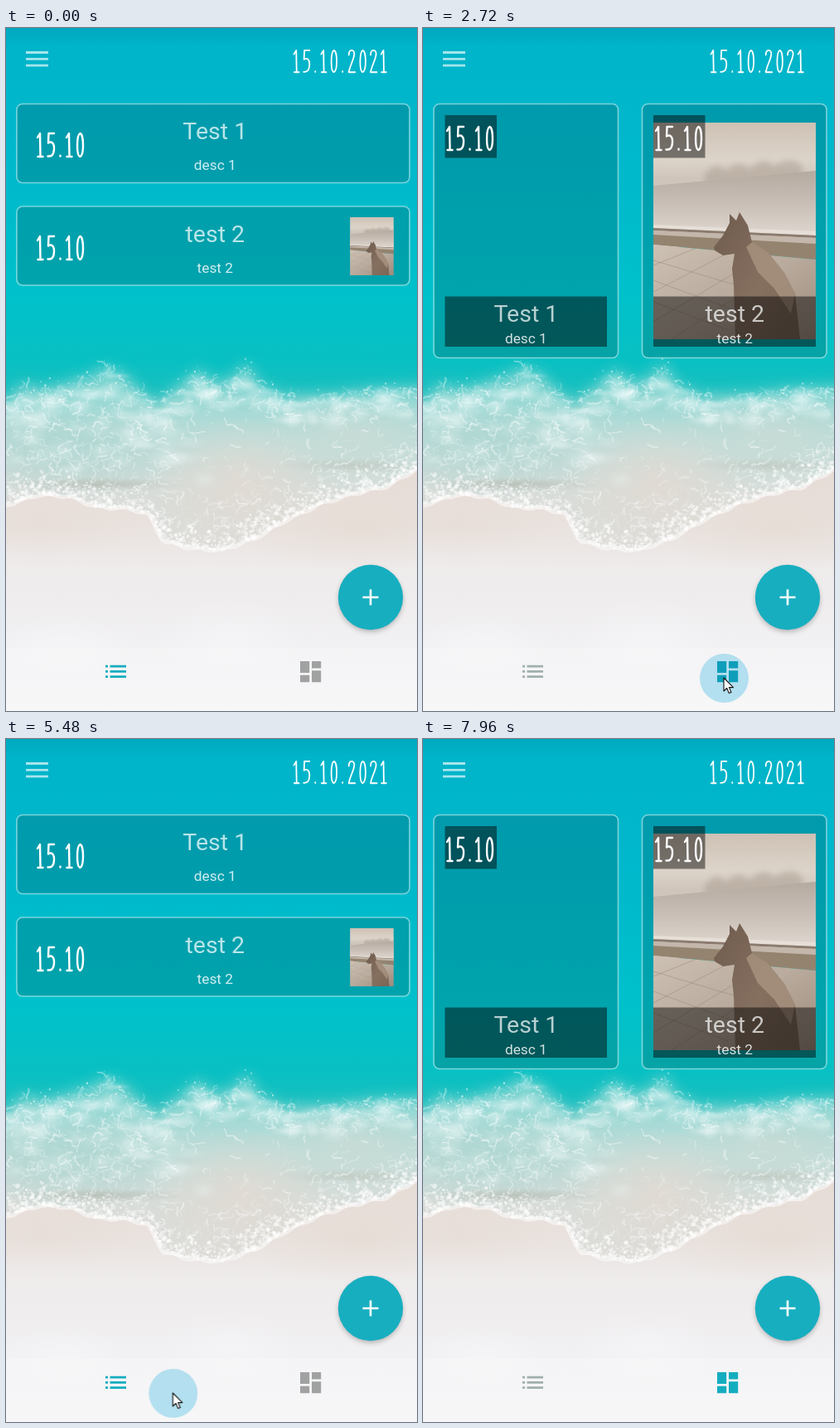
These frames come from a looping animation (496x823 px, 8 s). An HTML page with a canvas:

```html
<!DOCTYPE html>
<html lang="en">
<head>
<meta charset="utf-8">
<title>Day notes</title>
<style>
  html, body { margin: 0; width: 100%; height: 100%; overflow: hidden; }
  #stage { position: absolute; inset: 0; overflow: hidden; background: #f3f3f5; }
  #stage > * { position: absolute; left: 0; top: 0; display: block; }

  text { font-family: Roboto, sans-serif; text-anchor: middle; fill: #fff; }
  .title { font-size: 28.5px; fill-opacity: .72; }
  .desc { font-size: 17.3px; fill-opacity: .82; }
  .card { fill: rgba(0,0,0,.15); stroke: rgba(255,255,255,.48); stroke-width: 1.6; }
  .shade { fill: rgba(0,0,0,.47); }
  .date { fill: none; stroke: #fff; stroke-width: 2.4; stroke-linecap: round; stroke-linejoin: round; }
  .date.thin { stroke-width: 1.9; }
  .on { fill: #14adbf; }
  .off { fill: #a0a2a1; }
  .off.soft { fill: #a0b0ac; }

  .list, .grid, .glow, .move, .ring { animation: 8s infinite; }
  .list { animation-name: list; animation-timing-function: step-end; }
  .grid { animation-name: grid; animation-timing-function: step-end; }
  .glow { animation-name: glow; fill: #fff; opacity: 0; }
  .move { animation-name: move; animation-timing-function: ease-in-out; }
  .halo { width: 59px; height: 59px; margin: -29.5px; border-radius: 50%;
          background: #bae9f8; mix-blend-mode: multiply; }
  .ring { animation-name: ring; animation-timing-function: linear;
          fill: none; stroke: #8d9499; stroke-width: 3; }

  @keyframes list { 0%, 64.5% { opacity: 1 } 30%, 90.5%, 100% { opacity: 0 } }
  @keyframes grid { 0%, 64.5% { opacity: 0 } 30%, 90.5%, 100% { opacity: 1 } }
  @keyframes glow { 0%, 28.5% { opacity: 0 } 30.5% { opacity: .2 }
                    34%, 88.5% { opacity: 0 } 91% { opacity: .2 } 97%, 100% { opacity: 0 } }
  @keyframes move {
    0%, 10% { transform: translate(392px,854px); animation-timing-function: ease-out }
    14%, 31% { transform: translate(362px,776px) }
    33.5%, 46% { transform: translate(363px,783px); animation-timing-function: ease-in }
    49.5% { transform: translate(250px,795px); animation-timing-function: ease-out }
    52.5%, 65.5% { transform: translate(137px,784px); animation-timing-function: ease-in }
    68.5% { transform: translate(201px,788px); animation-timing-function: linear }
    71% { transform: translate(266px,790px); animation-timing-function: ease-out }
    76%, 83% { transform: translate(400px,786px) }
    85%, 88% { transform: translate(385px,785px) }
    91%, 92.5% { transform: translate(393px,784px); animation-timing-function: ease-in }
    96.5%, 100% { transform: translate(534px,784px) }
  }
  @keyframes ring {
    0%, 26.5%, 32.31%, 61%, 66.81%, 87% { r: 0px; opacity: .8 }
    32.3%, 66.8%, 92.8% { r: 29px; opacity: 0 }
    92.81%, 100% { r: 0px; opacity: 0 }
  }
</style>
</head>
<body>
<div id="stage">
  <canvas id="beach" width="496" height="823"></canvas>

  <svg width="496" height="823" viewBox="0 0 496 823">
    <defs>
      <linearGradient id="wall" x2="0" y2="1">
        <stop offset="0" stop-color="#cdc1b4"/>
        <stop offset=".3" stop-color="#ddd4c9"/>
        <stop offset=".45" stop-color="#cfc5bb"/>
      </linearGradient>
      <linearGradient id="blind" x2="0" y2="1">
        <stop offset="0" stop-color="#b5aaa0"/>
        <stop offset=".55" stop-color="#c9bfb6"/>
        <stop offset="1" stop-color="#ddd5cd"/>
      </linearGradient>
      <linearGradient id="floor" x2="1" y2="1">
        <stop offset="0" stop-color="#cdc1b3"/>
        <stop offset=".5" stop-color="#b9ab9d"/>
        <stop offset="1" stop-color="#9d8b7d"/>
      </linearGradient>
      <linearGradient id="fur" x2="1" y2="1">
        <stop offset="0" stop-color="#6f5b4d"/>
        <stop offset=".55" stop-color="#857060"/>
        <stop offset="1" stop-color="#7a6556"/>
      </linearGradient>
      <filter id="soft" x="-30%" y="-30%" width="160%" height="160%"><feGaussianBlur stdDeviation="3.5"/></filter>

      <symbol id="photo" viewBox="0 0 196 261">
        <path fill="url(#wall)" d="M0 0H196V150H0Z"/>
        <path fill="#a4968a" opacity=".45" filter="url(#soft)" d="M62 62q14-18 26-4 14-16 28-2 16-18 30-4 20-14 34 0V66L62 74Z"/>
        <path fill="url(#blind)" d="M0 76 196 58V132L0 124Z"/>
        <path fill="#e6dfd7" d="M0 123 196 131V136L0 127Z"/>
        <path fill="#8b7b6f" d="M0 127 196 136V139L0 130Z"/>
        <path fill="#c3b6aa" d="M0 130 196 139V146L0 135Z"/>
        <path fill="#94836f" d="M0 135 196 146V165L0 147Z"/>
        <path fill="url(#floor)" d="M0 147 196 165V261H0Z"/>
        <path fill="none" stroke="#93826f" stroke-width="1" opacity=".45"
          d="M0 172 50 152M0 204 92 156M0 240 100 180M22 261 104 208M0 166 100 196M0 190 98 226M0 216 90 250"/>
        <path fill="url(#fur)" d="M92 121 92 110 100 118 104 108 114 124 119 144 138 156 158 181 171 206 177 261H99L97 196 95 176 98 158 84 160 74 154 73 150 84 136Z"/>
        <path fill="#b09b87" opacity=".7" d="M119 144 138 156 158 181 171 206 166 230 146 200 126 180 112 150Z"/>
      </symbol>
      <path id="lines" d="M120 767.8h3v2.8h-3zm5.5 0H145v2.8h-19.5zM120 774h3v2.8h-3zm5.5 0H145v2.8h-19.5zM120 780.2h3v2.8h-3zm5.5 0H145v2.8h-19.5z"/>
      <path id="tiles" transform="translate(350.8 758.8) scale(1.4)" d="M3 13h8V3H3zm0 8h8v-6H3zm10 0h8V11h-8zm0-18v6h8V3z"/>
    </defs>

    <path fill="#fff" opacity=".22" d="M0 747H496V823H0Z"/>
    <path class="glow" d="M250 747H496V823H250Z"/>
    <path fill="none" stroke="#fff" stroke-opacity=".65" stroke-width="2.8" d="M24 29.500H51M24 37.300H51M24 45.200H51"/>
    <g class="date thin" data-date="15.10.2021" transform="translate(346.500 26) scale(.94)"></g>

    <g class="list">
      <rect class="card" x="13" y="91.5" width="474" height="95" rx="7"/>
      <rect class="card" x="13" y="215" width="474" height="95" rx="7"/>
      <g class="date" data-date="15.10" transform="translate(37 126)"></g>
      <g class="date" data-date="15.10" transform="translate(37 250)"></g>
      <text class="title" x="252.3" y="133.6">Test 1</text>
      <text class="desc" x="252.3" y="171">desc 1</text>
      <text class="title" x="252.3" y="257.6">test 2</text>
      <text class="desc" x="252.3" y="295">test 2</text>
      <use href="#photo" x="415" y="228" width="53" height="70"/>
      <use href="#lines" class="on"/>
      <use href="#tiles" class="off"/>
    </g>

    <g class="grid">
      <rect class="card" x="13" y="91.5" width="222.500" height="306" rx="7"/>
      <rect class="card" x="264.5" y="91.5" width="222.500" height="306" rx="7"/>
      <use href="#photo" x="278" y="114" width="196" height="261"/>
      <path class="shade" d="M26.500 105h62.500v51.500H26.500zM278 105h62.500v51.500H278zM26.500 323.500H222V384H26.500zM278 323.500H474V384H278z"/>
      <g class="date" data-date="15.10" transform="translate(28 118)"></g>
      <g class="date" data-date="15.10" transform="translate(280 118)"></g>
      <text class="title" x="124.4" y="353.6">Test 1</text>
      <text class="desc" x="124.4" y="379.5">desc 1</text>
      <text class="title" x="376.3" y="353.6">test 2</text>
      <text class="desc" x="376.3" y="379.5">test 2</text>
      <use href="#lines" class="off soft"/>
      <use href="#tiles" class="on"/>
    </g>

    <circle cx="440" cy="689" r="38" fill="#000" opacity=".3" filter="url(#soft)"/>
    <circle cx="440" cy="686" r="39.2" fill="#17aec0"/>
    <path fill="none" stroke="#fff" stroke-width="2.6" d="M430.500 686h19M440 676.500v19"/>
  </svg>

  <div class="halo move"></div>
  <svg class="move" width="1" height="1" overflow="visible">
    <circle class="ring"/>
    <path fill="#fff" stroke="#111" stroke-width="1.1" stroke-linejoin="round"
      d="M0 0V16L3.700 12.500 6.300 18.600 9 17.500 6.400 11.600H11.500Z"/>
  </svg>
</div>

<script>
// Narrow hand-lettered digits: [advance, stroke path], 30 units tall
const glyphs = {
  0: [14, 'M5.500 1C1 3 1 27 5 29 10.500 28 10 2 5.500 1'],
  1: [12, 'M1 6 4 1 4.500 29M1.500 29H7.500'],
  2: [14, 'M1.500 7C1.500-1 9-1 8.500 6 8 13 3 20 1.500 29H9.500'],
  5: [14, 'M9 1H2.500L2 12.500C6 10 9.500 13 9 20 8.500 27 6 29 1.500 28.500'],
  '.': [9, 'M2.500 27.800v.800']
};
for (const el of document.querySelectorAll('[data-date]')) {
  let x = 0;
  el.setAttribute('role', 'img');
  el.setAttribute('aria-label', el.dataset.date);
  for (const ch of el.dataset.date) {
    const [advance, d] = glyphs[ch];
    const path = document.createElementNS('http://www.w3.org/2000/svg', 'path');
    path.setAttribute('d', d);
    path.setAttribute('transform', `translate(${x} 0)`);
    el.append(path);
    x += advance;
  }
}

const W = 496, H = 823;
const g = document.getElementById('beach').getContext('2d');
let seed = 11;
const rnd = () => (seed = (seed * 16807) % 2147483647) / 2147483647;

const crest = [[0, 452], [18, 430], [45, 436], [75, 428], [100, 420], [122, 408], [142, 418], [160, 434],
  [178, 454], [200, 440], [232, 412], [250, 426], [265, 428], [290, 404], [308, 432], [335, 444],
  [400, 442], [435, 436], [496, 433]];
const shore = [[0, 575], [40, 562], [75, 564], [110, 577], [150, 579], [172, 586], [190, 618], [225, 627],
  [260, 629], [300, 615], [340, 592], [380, 573], [420, 561], [460, 552], [496, 531]];

function at(line, x) {
  const i = Math.max(1, line.findIndex(p => p[0] >= x));
  const [x0, y0] = line[i - 1], [x1, y1] = line[i];
  return y0 + (y1 - y0) * (x - x0) / (x1 - x0);
}
function ramp(y0, y1, stops) {
  const fill = g.createLinearGradient(0, y0, 0, y1);
  for (const [y, c] of stops) fill.addColorStop((y - y0) / (y1 - y0), c);
  return fill;
}
function glow(x, y, rx, ry, rgb, a) {
  g.save();
  g.translate(x, y);
  g.scale(rx, ry);
  const fill = g.createRadialGradient(0, 0, 0, 0, 0, 1);
  fill.addColorStop(0, `rgba(${rgb},${a})`);
  fill.addColorStop(1, `rgba(${rgb},0)`);
  g.fillStyle = fill;
  g.fillRect(-1, -1, 2, 2);
  g.restore();
}
function trace(line, pad = 0) {
  g.beginPath();
  for (let x = -pad; x <= W + pad; x += 4) {
    g.lineTo(x, at(line, Math.min(W, Math.max(0, x))) + Math.sin(x * .21) * 1.5);
  }
}
function fillBelow(line, fill, pad) {
  trace(line, pad);
  g.lineTo(W + pad, H + pad);
  g.lineTo(-pad, H + pad);
  g.fillStyle = fill;
  g.fill();
}
function dot(x, y, r, a) {
  g.fillStyle = `rgba(255,255,255,${a})`;
  g.beginPath();
  g.arc(x, y, r, 0, 7);
  g.fill();
}
function thread(x, y, steps, width, a) {
  let dir = rnd() * 6.283;
  g.strokeStyle = `rgba(250,254,254,${a})`;
  g.lineWidth = width;
  g.beginPath();
  g.moveTo(x, y);
  while (steps--) {
    dir += (rnd() - .5) * 1.8;
    x += Math.cos(dir) * 2.5;
    y += Math.sin(dir) * 2;
    g.lineTo(x, y);
  }
  g.stroke();
}

// open sea
g.fillStyle = ramp(0, H, [[0, '#00a8bf'], [22, '#00b4c9'], [150, '#00b8cb'], [320, '#00c1cb'],
  [400, '#08c0c3'], [450, '#1dbfbe'], [H, '#1dbfbe']]);
g.fillRect(0, 0, W, H);

// shallows behind the breaking wave
g.filter = 'blur(9px)';
fillBelow(crest, ramp(400, 630, [[400, '#6fd3d0'], [440, '#8fd7d3'], [475, '#b2dbd7'], [515, '#c6dcd8'],
  [560, '#d8dcd8'], [630, '#dedcd8']]), 24);
g.filter = 'none';
glow(80, 512, 150, 55, '158,208,203', .5);
glow(285, 550, 110, 80, '226,218,211', .85);
glow(420, 490, 120, 45, '205,219,213', .7);
glow(110, 550, 105, 9, '160,158,146', .4);
glow(420, 527, 95, 9, '176,170,158', .3);

// sand
fillBelow(shore, ramp(530, H, [[530, '#e6dbd5'], [600, '#e9e2de'], [650, '#eeebeb'], [740, '#f1f0f2'], [H, '#f4f4f6']]), 0);
glow(430, 605, 150, 50, '228,216,207', .5);
glow(40, 600, 130, 36, '229,218,211', .45);
glow(270, 735, 90, 50, '246,245,247', .6);
glow(70, 745, 80, 40, '247,246,248', .6);

// foam: soft clumps, then fine lace and spray
g.lineJoin = g.lineCap = 'round';
for (let i = 0; i < 130; i++) {
  const x = rnd() * W;
  glow(x, at(crest, x) + 4 + rnd() * 30, 7 + rnd() * 16, 4 + rnd() * 9, '240,250,250', .12 + rnd() * .28);
}
for (let i = 0; i < 50; i++) {
  glow(rnd() * 240, 460 + rnd() * 85, 8 + rnd() * 20, 5 + rnd() * 9, '238,248,247', .1 + rnd() * .3);
}
for (let i = 0; i < 1000; i++) {
  const x = rnd() * W, u = Math.pow(rnd(), 1.2), top = at(crest, x) - 2;
  const calm = x > 230 && u > .22 && u < .72;
  if (calm && rnd() < .75) continue;
  thread(x, top + u * (at(shore, x) - 8 - top), 2 + rnd() * 6 | 0, .6 + rnd() * 1.8, .1 + rnd() * .38);
}
for (let i = 0; i < 260; i++) {
  const x = rnd() * W;
  dot(x, at(crest, x) + (rnd() + rnd() - .7) * 18, .4 + rnd() * .9, .2 + rnd() * .4);
}
for (let i = 0; i < 1200; i++) {
  const x = rnd() * W;
  dot(x, at(shore, x) - rnd() * rnd() * 36, .6 + rnd() * 1.9, .2 + rnd() * .45);
}
trace(shore);
g.strokeStyle = 'rgba(255,255,255,.5)';
g.lineWidth = 5;
g.stroke();
</script>
</body>
</html>
```
